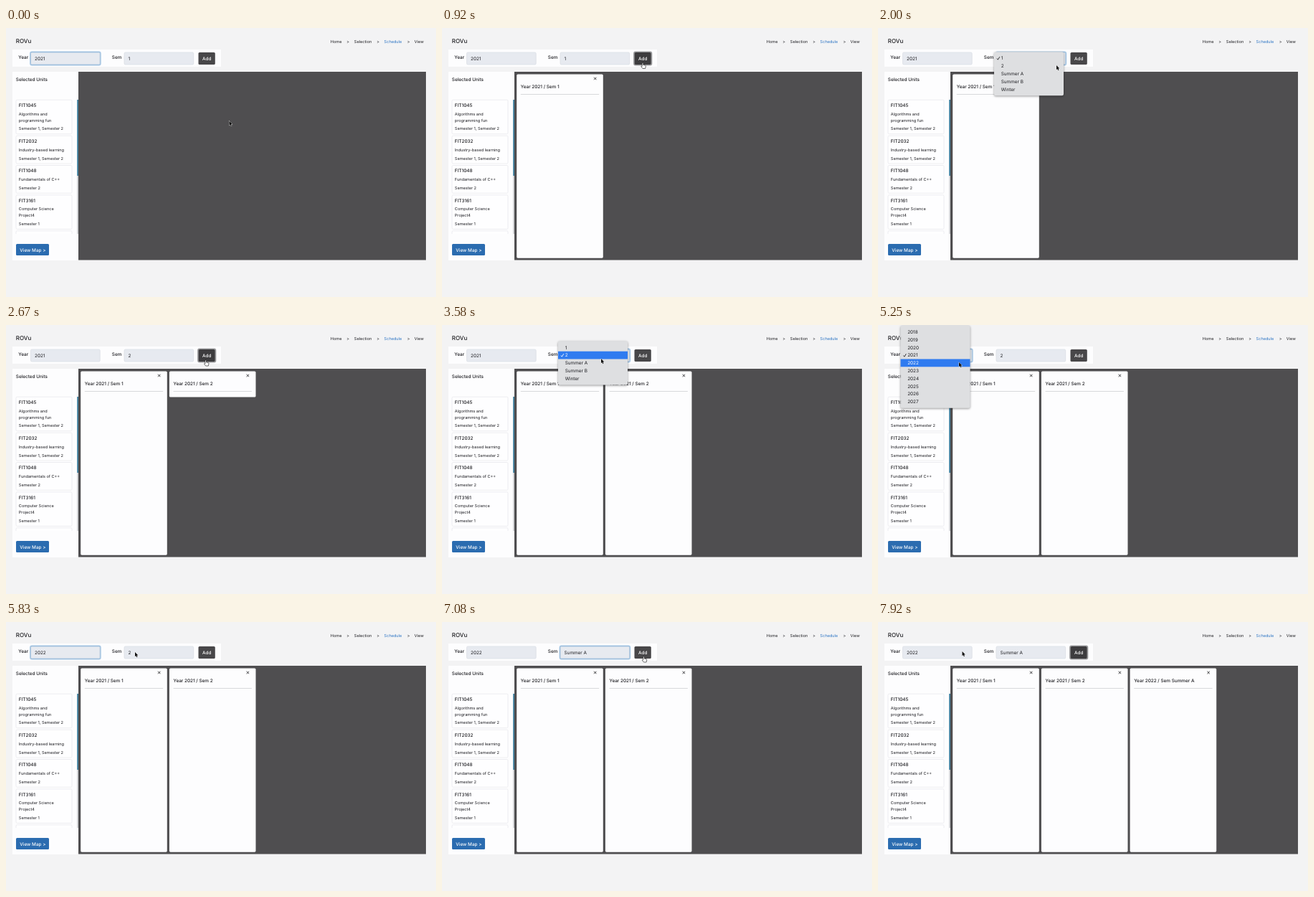
An HTML page that plays this animation: 600 by 375 pixels, repeating every 8000 ms.

```html
<!DOCTYPE html>
<html lang="en">
<head>
<meta charset="utf-8">
<title>Unit schedule</title>
<style>
  html, body { margin: 0; width: 100%; height: 100%; overflow: hidden; background: #f3f3f4; }
  svg { display: block; width: 600px; height: 375px; font-family: Inter, sans-serif; text-rendering: geometricPrecision; }
  text { white-space: pre; }
</style>
</head>
<body>
<svg viewBox="0 0 600 375"><g id="page"></g><g id="live"></g></svg>
<script>
const SMALL = 5.6, BASE = 6.4;
const FPS = 12, LOOP = 8000;
const ROW = 10.8;

const rect = (x, y, w, h, fill, extra = '') =>
  `<rect x="${x}" y="${y}" width="${w}" height="${h}" fill="${fill}" ${extra}/>`;
// Text is placed by the vertical middle of its capitals.
const text = (str, x, y, size = BASE, weight = 400, fill = '#1c1c20') =>
  `<text x="${x}" y="${y + size * 0.36}" font-size="${size}" font-weight="${weight}" fill="${fill}">${str}</text>`;

const fields = {
  year: { x: 34.5, items: Array.from({ length: 10 }, (_, i) => String(2018 + i)), first: 3 },
  sem: { x: 165, items: ['1', '2', 'Summer A', 'Summer B', 'Winter'], first: 0 },
};

// Each menu opens, blinks its choice when picked, then fades.
const BLINK = 80, HOLD = 165, FADE = 250;
const menus = [
  { field: 'sem', open: 1330, pick: 2000, choice: 1 },
  { field: 'sem', open: 3420, pick: 4080, choice: 1 },
  { field: 'year', open: 4750, pick: 5420, choice: 4 },
  { field: 'sem', open: 6000, pick: 6500, choice: 2 },
];
const focusChanges = [[0, 'year'], [750, 'add'], [1330, 'sem'], [2580, 'add'], [3420, 'sem'],
  [4750, 'year'], [6000, 'sem'], [7250, 'add']];
const columns = [[830, '2021 / Sem 1'], [2670, '2021 / Sem 2'], [7330, '2022 / Sem Summer A']];

// Pointer stops: time, x, y
const stops = [
  [0, 311.5, 129.5], [500, 285, 53], [580, 285, 53], [670, 280, 48.5], [1000, 280, 48.5],
  [1170, 244, 43], [1500, 244, 43], [1670, 246, 51], [1750, 246, 51], [1920, 249, 52],
  [2080, 249, 52], [2420, 278.7, 49], [2830, 278.7, 49], [3080, 223, 49.5], [3170, 223, 49.5],
  [3250, 222, 47], [3670, 222, 47], [3830, 223, 50], [4170, 223, 50], [4670, 110.5, 41.5],
  [4920, 110.5, 41.5], [5250, 113, 52], [5500, 113, 52], [5830, 180, 42], [6080, 180, 42],
  [6420, 188, 52], [6750, 188, 52], [7080, 281.5, 48], [7500, 281.5, 48], [7920, 117.5, 41],
];

function pointerAt(t) {
  const i = stops.findIndex(s => s[0] > t);
  if (i < 0) return stops[stops.length - 1].slice(1);
  const [t0, x0, y0] = stops[i - 1], [t1, x1, y1] = stops[i];
  const p = (t - t0) / (t1 - t0), e = p * p * (3 - 2 * p);
  return [x0 + (x1 - x0) * e, y0 + (y1 - y0) * e];
}

const selectedAt = (name, t) => menus.reduce(
  (sel, m) => m.field === name && t >= m.pick + HOLD ? m.choice : sel, fields[name].first);

function unitCard(y, code, lines) {
  const h = lines.length > 2 ? 47.5 : 38.7;
  const last = lines.length - 1;
  return rect(14, y, 78, h, '#fefeff', 'rx="1.5" stroke="#e2e3e7" stroke-width=".6"')
    + text(code, 17.8, y + 7.4, BASE, 500)
    + lines.map((line, i) => text(line, 17.8, y + 19.5 + i * 8.8 + (i === last ? 3.1 : 0), SMALL)).join('');
}

function drawPage() {
  const nav = [['Home', 452.8], ['>', 475.3], ['Selection', 485.8], ['>', 517.3],
    ['Schedule', 527.6, '#2b74c4'], ['>', 559.8], ['View', 569.8]];
  const cards = [
    [100.2, 'FIT1045', ['Algorithms and', 'programming fun', 'Semester 1, Semester 2']],
    [150.2, 'FIT2032', ['Industry-based learning', 'Semester 1, Semester 2']],
    [191.5, 'FIT1048', ['Fundamentals of C++', 'Semester 2']],
    [232.9, 'FIT3161', ['Computer Science', 'Project4', 'Semester 1']],
    [282.8, '', []],
  ];
  return text('ROVu', 13.8, 18.5, 8, 500)
    + nav.map(([s, x, fill]) => text(s, x, 18.8, SMALL, 400, fill)).join('')
    + rect(9, 30, 291, 24, '#fdfdfe')
    + text('Year', 17.3, 41, BASE, 500) + text('Sem', 147.8, 41, BASE, 500)
    + rect(9, 61, 92, 263, '#fdfdfe') + rect(101, 61, 485, 262.5, '#4f4e50')
    + text('Selected Units', 13.8, 72, BASE, 500)
    + `<clipPath id="list"><path d="M9 99H101V287H9Z"/></clipPath><g clip-path="url(#list)">`
    + cards.map(c => unitCard(...c)).join('') + '</g>'
    + rect(99.2, 100, 1.8, 106, '#3b7c9c') + rect(99.2, 206, 1.8, 81, '#cdced1')
    + rect(14, 301, 46, 16, '#2b6cb0', 'rx="1.5"') + text('View Map >', 19.3, 309.3, BASE, 500, '#fff');
}

function drawColumn([start, label], i, t) {
  if (t < start) return '';
  const x = 104.2 + i * 123.7, bottom = t < start + 80 ? 100.5 : 320.7;
  return rect(x, 64.5, 120.6, bottom - 64.5, '#fdfdfe', 'rx="1.6"')
    + text('Year ' + label, x + 5.6, 82, BASE, 500)
    + rect(x + 5.6, 92.2, 109.4, 0.7, '#c9cacd')
    + `<path d="M${x + 107.8} 68.8l3.4 3.4m0-3.4l-3.4 3.4" stroke="#1c1c20" stroke-width=".9"/>`;
}

function drawField(name, t, focus) {
  const { x, items } = fields[name], on = focus === name;
  return (on ? rect(x - 0.7, 33.2, 98.2, 18.6, 'none', 'rx="2.2" stroke="#a9c9e6" stroke-width="1.4"') : '')
    + rect(x, 34, 96.7, 17, '#e7eaf0', `rx="1.6" stroke="${on ? '#86abcd' : '#d3d8e0'}" stroke-width=".6"`)
    + text(items[selectedAt(name, t)], x + 5.5, 42.8);
}

function drawAdd(focus) {
  const on = focus === 'add';
  return (on ? rect(267.8, 33.2, 24.8, 18.6, 'none', 'rx="2.2" stroke="#99999b" stroke-width="1.4"') : '')
    + rect(268.5, 34, 23.3, 17, on ? '#3d3c3e' : '#484749', 'rx="1.6"')
    + text('Add', 274, 42.7, BASE, 500, '#fff');
}

function drawMenu({ field, open, pick }, t, pointerY) {
  const opacity = Math.min(1, 1 - (t - pick - HOLD) / FADE);
  if (t < open || opacity <= 0) return '';
  const { x: fieldX, items } = fields[field];
  const x = fieldX - 3, selected = selectedAt(field, Math.min(t, pick));
  const top = 33.2 - selected * ROW, h = items.length * ROW + 7;
  const blinkOff = t >= pick && t < pick + BLINK;
  const y0 = top + 3.5;
  const hot = blinkOff ? -1 : t < pick
    ? Math.floor((pointerY - y0) / ROW)
    : menus.find(m => m.pick === pick).choice;
  return `<g opacity="${opacity}">`
    + rect(x, top, 97, h, '#dedfe1', 'rx="2.2" style="filter:drop-shadow(0 1px 1.6px #0006)"')
    + items.map((item, i) => {
      const mid = y0 + (i + 0.5) * ROW, fill = i === hot ? '#fff' : '#1c1c20';
      return (i === hot ? rect(x, mid - ROW / 2, 97, ROW, '#2f7bf0') : '')
        + text(item, x + 9.7, mid, BASE, 400, fill)
        + (i === selected ? `<path d="M${x + 4} ${mid + 0.4}l1.3 1.7 2.5-4" fill="none" stroke="${fill}" stroke-width=".9"/>` : '');
    }).join('') + '</g>';
}

function drawPointer(x, y) {
  const overAdd = x > 268 && x < 292 && y > 34 && y < 51;
  const shape = overAdd
    ? '<path d="M-.8.7a.8.8 0 0 1 1.6 0V3l2.8.6q.9.3.7 1.3L3.6 8H0L-2.2 5.2q.2-1 1.4-.2Z" fill="#fff" stroke="#111" stroke-width=".6"/>'
    : '<path d="M0 0V6.2L1.4 5 2.4 7.2 3.4 6.8 2.5 4.6H4.4Z" fill="#111" stroke="#fff" stroke-width=".7" paint-order="stroke"/>';
  return `<g transform="translate(${x} ${y})">${shape}</g>`;
}

const page = document.getElementById('page'), live = document.getElementById('live');
page.innerHTML = drawPage();
let shown = -1;

function tick() {
  const step = Math.floor((performance.now() % LOOP + 4) * FPS / 1000) % (LOOP / 1000 * FPS);
  if (step !== shown) {
    shown = step;
    const t = step * 1000 / FPS + 4;
    const [x, y] = pointerAt(t);
    const focus = focusChanges.filter(f => t >= f[0]).pop()[1];
    live.innerHTML = columns.map((c, i) => drawColumn(c, i, t)).join('')
      + drawField('year', t, focus) + drawField('sem', t, focus) + drawAdd(focus)
      + menus.map(m => drawMenu(m, t, y)).join('')
      + drawPointer(x, y);
  }
  requestAnimationFrame(tick);
}
tick();
</script>
</body>
</html>
```
